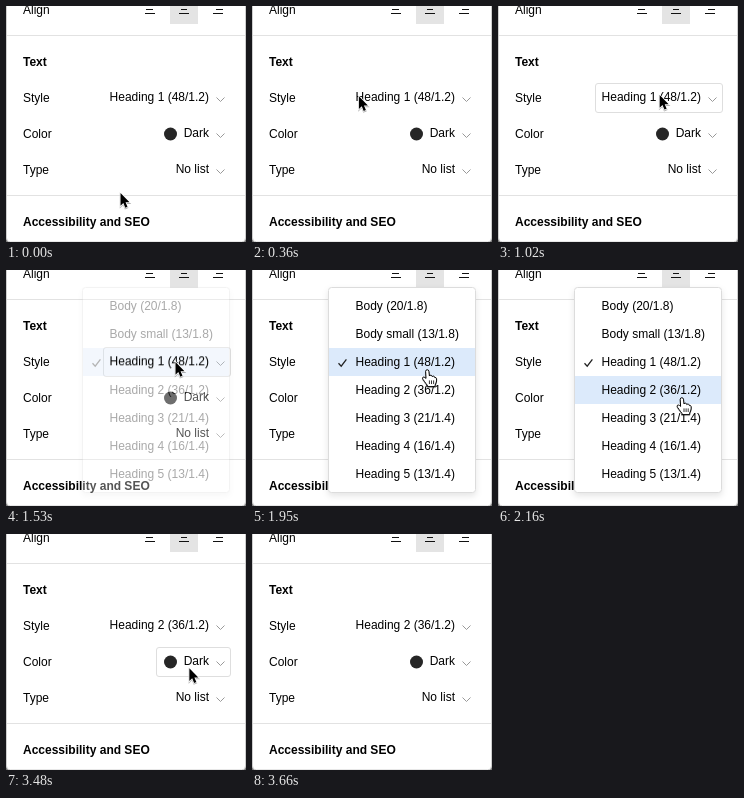
Recreate the animation shown at these times as an HTML page. Size 240 by 236 pixels, loop 4290 ms.

```html
<!DOCTYPE html>
<html lang="en">
<head>
<meta charset="utf-8">
<title>Text style panel</title>
<style>
html, body { margin: 0; width: 100%; height: 100%; overflow: hidden; background: #fff; }
svg { display: block; width: 240px; height: 236px; }
text { font: 12px "Liberation Sans", Arial, sans-serif; fill: #000; }
.bold { font-weight: 700; }
.end { text-anchor: end; }
.line { fill: none; stroke: #e2e2e2; }
.field { fill: none; stroke: #dedede; }
#chevron { fill: none; stroke: #999; }
#menu { filter: drop-shadow(0 3px 3px rgba(0, 0, 0, .1)); }
.cursor { filter: drop-shadow(0 1px .7px rgba(0, 0, 0, .3)); }
</style>
</head>
<body>
<svg viewBox="0 0 240 236">
  <defs><path id="chevron" d="M-4 -2L0 2L4 -2"/></defs>
  <path d="M0 231V236H5ZM240 231V236H235Z" fill="#777"/>
  <path d="M.5 -1V232Q.5 236 4.5 236H235.5Q239.5 236 239.5 232V-1" fill="#fff" stroke="#cfcfcf"/>

  <rect x="164" width="28" height="18" fill="#e4e4e4"/>
  <path d="M140 3.5h7M139 7.5h10M175 3.5h6M173 7.5h10M210 3.5h7M207 7.5h10" stroke="#111"/>
  <path class="line" d="M1 29.5H239M1 189.5H239"/>

  <text x="17" y="8">Align</text>
  <text x="17" y="60" class="bold">Text</text>
  <text x="17" y="96">Style</text>
  <text x="17" y="132">Color</text>
  <text x="17" y="168">Type</text>
  <text x="17" y="220" class="bold">Accessibility and SEO</text>

  <rect id="styleField" class="field" x="97.5" y="77.5" width="127" height="29" rx="2.5"/>
  <rect id="colorField" class="field" x="150.5" y="113.5" width="74" height="29" rx="2.5"/>
  <text id="styleValue" x="203" y="95" class="end"></text>
  <text x="203" y="131" class="end">Dark</text>
  <text x="203" y="167" class="end">No list</text>
  <circle cx="164.5" cy="128" r="6.5" fill="#262626"/>
  <use href="#chevron" x="214.5" y="93.5"/>
  <use href="#chevron" x="214.5" y="129.5"/>
  <use href="#chevron" x="214.5" y="165.5"/>

  <g id="menu">
    <rect x="76.5" y="17.5" width="147" height="205" rx="3" fill="#fff" stroke="#dcdcdc"/>
    <rect id="highlight" x="77" width="146" height="28" fill="#dceafb"/>
    <path d="M86.5 93.3l2.7 2.9l5.2 -6.9" fill="none" stroke="#222" stroke-width="1.3"/>
    <g id="items"></g>
  </g>

  <g id="arrow" class="cursor">
    <path transform="translate(.5 1) scale(.92)" d="M0 0V13.8L3.1 10.9L5.2 15.9L7.6 14.9L5.5 10H9.8Z" stroke="#fff" stroke-width="1.6" paint-order="stroke"/>
  </g>
  <g id="hand" class="cursor">
    <g transform="translate(-1 0)" fill="#fff" stroke="#000" stroke-linejoin="round">
      <path d="M-1.4 8.4L-1.8 1.3Q-1.6 -.3 -.2 -.3Q1.2 -.3 1.5 1.2L2 6Q2.6 4.9 3.7 5.2Q4.7 5.5 4.8 6.6Q5.6 5.7 6.6 6.2Q7.3 6.6 7.4 7.6Q8.9 7.1 9.2 8.7Q9.4 11 8.6 13L7.7 15V16.6H0V15.4Q-1.8 13.2 -3 11.4Q-4.9 9 -4.9 8.2Q-4.8 6.9 -3.6 7Q-2.5 7.2 -1.4 8.4Z"/>
      <path d="M2 10.4v3.6M4.1 10.4v3.6M6.2 10.4v3.6" stroke-width=".8"/>
    </g>
  </g>
</svg>
<script>
const LOOP = 4290, STEP = 30, ROW = 28, TOP = 22;
const OPEN = 1500, CLOSE = 2490, FADE = 90;

const sizes = ["48/1.2", "36/1.2", "21/1.4", "16/1.4", "13/1.4"];
const styles = ["Body (20/1.8)", "Body small (13/1.8)",
  ...sizes.map((size, i) => `Heading ${i + 1} (${size})`)];

const linear = u => u;
const easeOut = u => 1 - (1 - u) ** 3;

// Pointer sweeps along cubic curves, resting in between
const moves = [
  { from: 0, to: 480, ease: linear, x: [114, 66, 84, 142], y: [186, 128, 76, 86] },
  { from: 600, to: 1200, ease: linear, x: [142, 150, 161, 169], y: [86, 22, 114, 91] },
  { from: 1920, to: 2160, ease: easeOut, x: [169, 177, 184, 185], y: [91, 95, 118, 128] },
  { from: 3450, to: 3660, ease: linear, x: [185, 184, 152, 146], y: [128, 135, 180, 242] }
];

const $ = id => document.getElementById(id);
const clamp = v => Math.max(0, Math.min(1, v));
const show = (id, on) => $(id).setAttribute("visibility", on ? "visible" : "hidden");

function cubic([a, b, c, d], u) {
  const v = 1 - u;
  return a * v ** 3 + 3 * b * v * v * u + 3 * c * v * u * u + d * u ** 3;
}

function pointer(t) {
  const { from, to, ease, x, y } = moves.filter(m => m.from <= t).pop();
  const u = ease(clamp((t - from) / (to - from)));
  return [cubic(x, u), cubic(y, u)];
}

styles.forEach((name, i) => {
  const item = document.createElementNS("http://www.w3.org/2000/svg", "text");
  item.setAttribute("x", 103.5);
  item.setAttribute("y", TOP + 18 + ROW * i);
  item.textContent = name;
  $("items").append(item);
});

function draw(now) {
  const t = Math.floor(now % LOOP / STEP) * STEP;
  const [x, y] = pointer(t);
  const opacity = clamp((t - OPEN) / FADE) * clamp(1 - (t - CLOSE) / FADE);
  const pointing = t >= OPEN + FADE && t < 2670;
  const row = Math.floor((y - TOP) / ROW);

  $("styleValue").textContent = styles[t < CLOSE ? 2 : 3];
  show("styleField", t >= 930 && t < OPEN + FADE);
  show("colorField", t >= 2670 && y < 143);

  $("menu").setAttribute("opacity", opacity);
  show("menu", opacity > 0);
  $("highlight").setAttribute("y", TOP + ROW * row);

  show("arrow", !pointing);
  show("hand", pointing);
  $(pointing ? "hand" : "arrow").setAttribute("transform", `translate(${x} ${y})`);
}

function tick() {
  draw(performance.now());
  requestAnimationFrame(tick);
}
tick();
</script>
</body>
</html>
```
